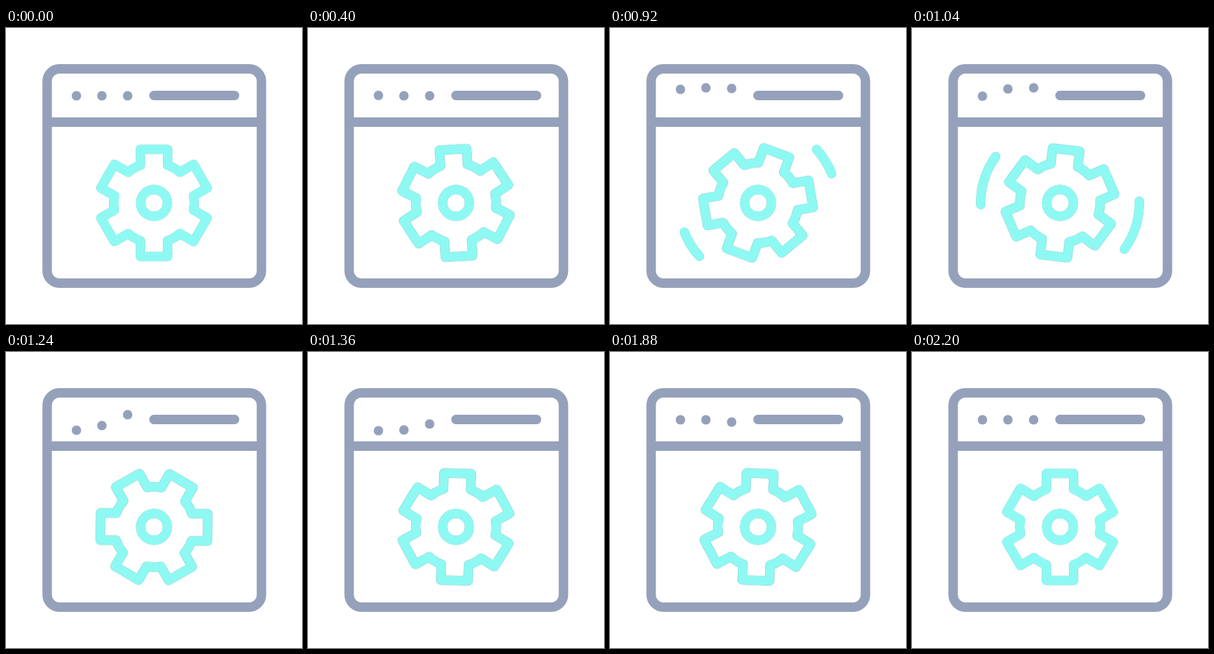
Recreate the animation shown at these times as an HTML page without scripts. Size 500 by 500 pixels, loop 2400 ms.

```html
<!DOCTYPE html>
<html lang="en">
<head>
<meta charset="utf-8">
<title>Window settings</title>
<style>
  @property --head { syntax: "<length>"; inherits: false; initial-value: 0px; }
  @property --tail { syntax: "<length>"; inherits: false; initial-value: 0px; }

  html, body { margin: 0; width: 100%; height: 100%; overflow: hidden; background: #fff; }
  svg { display: block; width: 100%; height: 100%; }

  .frame { fill: none; stroke: #95a1bb; stroke-width: 16; stroke-linecap: round; }
  .mint {
    fill: none; stroke: #8ef9f3; stroke-width: 15.6; stroke-linecap: round; stroke-linejoin: round;
    filter: drop-shadow(0 0 .5px #7f8f98);
  }

  .dot { fill: #95a1bb; animation: bob 2.4s infinite cubic-bezier(.667, 0, .333, 1); }
  .dot:nth-child(2) { animation-delay: 140ms; }
  .dot:nth-child(3) { animation-delay: 280ms; }
  @keyframes bob {
    0%, 12.5% { transform: translateY(0); }
    31.9% { transform: translateY(-13.5px); }
    55.8% { transform: translateY(18.5px); }
    73.3%, 100% { transform: translateY(0); }
  }

  /* wind up, half turn with overshoot, settle */
  .gear { animation: spin 2.4s infinite cubic-bezier(.333, 0, .667, 1); }
  @keyframes spin {
    0% { transform: rotate(0deg); }
    8.75% { transform: rotate(0deg); animation-timing-function: cubic-bezier(.17, .17, .67, 1); }
    31.9% { transform: rotate(-7.2deg); }
    59.2% { transform: rotate(186.2deg); }
    91.67%, 100% { transform: rotate(180deg); }
  }

  /* speed arcs: the tail follows the head along the path */
  .arc {
    stroke-dasharray: calc(var(--head) - var(--tail)) 300px;
    stroke-dashoffset: calc(0px - var(--tail));
    animation: head 2.4s infinite cubic-bezier(.667, 0, .333, 1),
               tail 2.4s infinite cubic-bezier(.667, 0, .333, 1),
               show 2.4s infinite step-end;
  }
  @keyframes head {
    0%, 31.2% { --head: .1px; }
    48.7%, 100% { --head: 100px; }
  }
  @keyframes tail {
    0%, 35% { --tail: 0px; }
    51.9%, 100% { --tail: 99.9px; }
  }
  @keyframes show {
    0% { opacity: 0; }
    31.3% { opacity: 1; }
    51.2%, 100% { opacity: 0; }
  }
</style>
</head>
<body>
<svg viewBox="0 0 500 500">
  <defs>
    <path id="tooth" d="M-23-63.8V-90.5H23V-63.8A67.9 67.9 0 0 1 43.8-51.8"/>
  </defs>

  <g class="frame">
    <rect x="69.5" y="69" width="362" height="362" rx="21"/>
    <path d="M70 159H431M250 114H386"/>
  </g>

  <g>
    <circle class="dot" cx="119" cy="114.5" r="8"/>
    <circle class="dot" cx="162" cy="114.5" r="8"/>
    <circle class="dot" cx="205.5" cy="114.5" r="8"/>
  </g>

  <g class="mint" transform="translate(250 295.5)">
    <circle r="22.6"/>
    <g class="gear">
      <use href="#tooth"/>
      <use href="#tooth" transform="rotate(60)"/>
      <use href="#tooth" transform="rotate(120)"/>
      <use href="#tooth" transform="rotate(180)"/>
      <use href="#tooth" transform="rotate(240)"/>
      <use href="#tooth" transform="rotate(300)"/>
    </g>
    <path class="arc" pathLength="100" d="M-93 96.4A134 134 0 0 1-93-96.4"/>
    <path class="arc" pathLength="100" d="M93-96.4A134 134 0 0 1 93 96.4"/>
  </g>
</svg>
</body>
</html>
```
